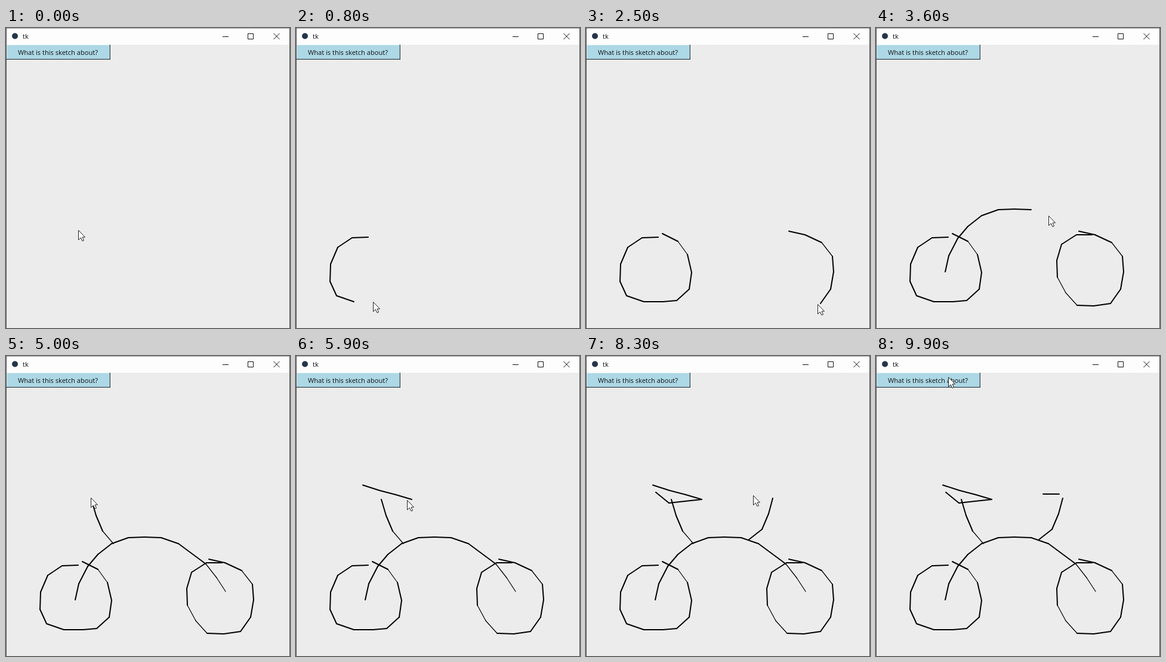
Write an HTML page that moves like this. It is 476 px wide and 502 px high and loops after 10 s.

```html
<!DOCTYPE html>
<html lang="en">
<head>
<meta charset="utf-8">
<title>tk</title>
<style>
  html, body { margin: 0; width: 100%; height: 100%; overflow: hidden; background: #ececec; }
  svg { display: block; width: 476px; height: 502px; }
  text { font: 11.1px "Open Sans", "Noto Sans", sans-serif; fill: #111; }
  .icon { fill: none; stroke: #111; stroke-width: 1; }
  #ink line { stroke: #000; stroke-width: 2; stroke-linecap: round; }
  #ink line.thin { stroke-width: 1.25; }
</style>
</head>
<body>
<svg viewBox="0 0 476 502">
  <rect width="476" height="502" fill="#ececec"/>
  <rect width="476" height="28" fill="#fdfdfd"/>
  <path d="M0 .5H476" stroke="#999"/>
  <path d="M.5 0V502M475.5 0V502" stroke="#555"/>
  <circle cx="15" cy="13.5" r="5" fill="#24364a"/>
  <text x="28" y="18">tk</text>
  <path class="icon" d="M363 14.5H373M405.5 9.5H414.5V18.5H405.5ZM448.5 9L458.5 19M458.5 9L448.5 19"/>

  <rect x="1" y="28" width="174" height="25" fill="#34434a"/>
  <rect x="1" y="28" width="172.5" height="23.5" fill="#d8ecf3"/>
  <rect x="2" y="29" width="171.5" height="22.5" fill="#add8e6"/>
  <text x="20" y="44.5">What is this sketch about?</text>

  <g id="ink"></g>
  <path id="cursor" d="M0 0V16L3.8 12.5L6.5 18L9 17L6.5 11.5H11Z"
        fill="#fff" stroke="#222" stroke-width="1" stroke-linejoin="round"/>
</svg>
<script>
const LOOP = 10000, STEP = 100;
const moves = [];

const parse = s => s.split(' ').map(p => p.split(',').map(Number));

function draw(start, end, path) {
  moves.push({ start, end, pts: parse(path), ink: true });
}

// Pen up: continue from wherever the previous move ended.
function travel(start, end, path) {
  const last = moves.length ? moves[moves.length - 1].pts.slice(-1) : [];
  moves.push({ start, end, pts: [...last, ...parse(path)], ink: false });
}

travel(0, 1, '121,338');
// left wheel
draw(100, 1400, '121,350 94,351 70,367 58,395 57,424 68,448 97,458 129,458 152,456 173,437 177,409 170,379 154,357 128,344');
travel(1400, 1500, '193,371');
travel(1500, 2000, '270,350 340,340');
// right wheel
draw(2000, 2170, '340,340 367,346');
draw(2170, 3000, '367,346 395,359 413,382 415,408 410,437 393,461 365,465 337,464 318,443 304,417 303,389 311,362 336,346 362,346');
travel(3000, 3300, '116,411');
// frame
draw(3300, 3713, '116,408 122,381 137,352 154,332 177,314 205,304 232,303 260,304 289,314 335,348 353,371 368,394');
travel(3713, 4400, '178,315');
travel(4400, 4500, '180,313');
// seat post and seat
draw(4600, 4980, '180,314 162,293 151,267 143,240');
travel(4980, 5000, '142,237');
travel(5100, 5300, '112,216');
draw(5300, 6400, '112,216 140,225 167,232 194,240 166,243 139,246 117,228');
travel(6400, 6500, '117,208');
travel(6600, 6900, '285,284');
travel(6900, 7200, '273,312');
// handlebar
draw(7400, 7780, '272,308 295,290 306,264 313,238');
travel(7780, 7800, '316,231');
travel(7900, 8300, '280,233');
draw(8310, 8600, '280,231 307,231');
travel(8600, 8700, '334,238');
travel(8900, 9600, '113,20');
travel(9600, 9900, '121,35');

const ink = document.getElementById('ink');
const cursor = document.getElementById('cursor');

function addLine([x1, y1], [x2, y2]) {
  const line = document.createElementNS('http://www.w3.org/2000/svg', 'line');
  Object.entries({ x1, y1, x2, y2 }).forEach(([k, v]) => line.setAttribute(k, v));
  const slope = (y2 - y1) / (x2 - x1);
  if (slope > 1.05 && slope < 2) line.classList.add('thin');
  ink.append(line);
  return line;
}

for (const m of moves) {
  if (m.ink) m.lines = m.pts.slice(1).map((p, i) => addLine(m.pts[i], p));
}

const progress = (m, t) =>
  Math.min(1, Math.max(0, (t - m.start) / (m.end - m.start))) * (m.pts.length - 1);

function pointAt(m, t) {
  const p = progress(m, t), i = Math.floor(p);
  const a = m.pts[i], b = m.pts[i + 1] || a;
  return a.map((v, k) => v + (b[k] - v) * (p - i));
}

function render(t) {
  let current = moves[0];
  for (const m of moves) {
    if (m.start <= t) current = m;
    if (!m.ink) continue;
    // A segment appears once the pointer has passed its end point.
    const p = progress(m, t);
    m.lines.forEach((line, i) => {
      line.style.display = t >= m.end || i + 1 < p ? '' : 'none';
    });
  }
  cursor.setAttribute('transform', `translate(${pointAt(current, t).map(v => Math.round(v) + .5)})`);
}

const origin = performance.now();
function tick() {
  const t = (performance.now() - origin) % LOOP;
  render(Math.floor(t / STEP) * STEP);
  requestAnimationFrame(tick);
}
tick();
</script>
</body>
</html>
```
